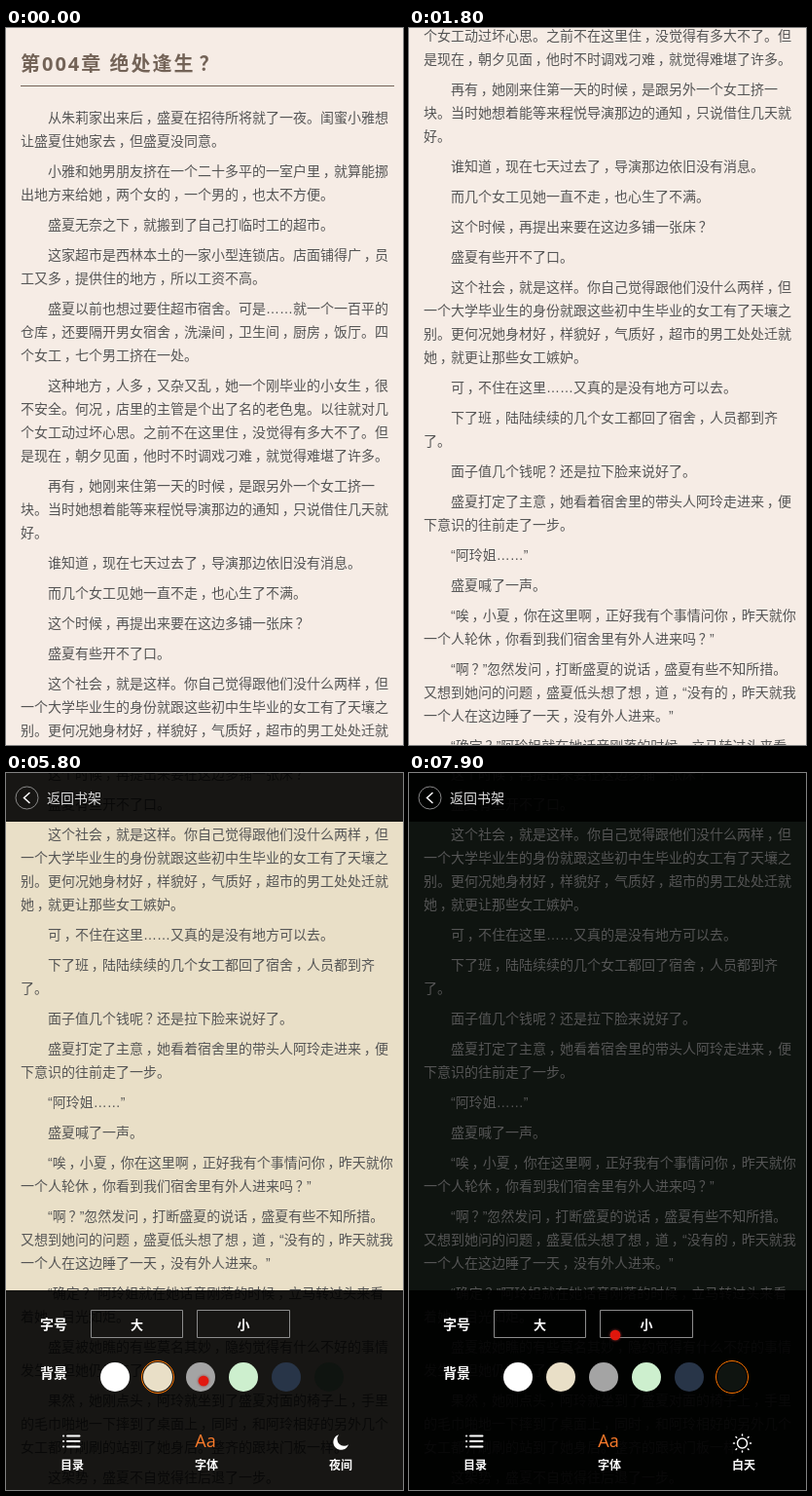
These frames come from a looping animation (408x736 px, 8000 ms). An HTML page:

```html
<!DOCTYPE html>
<html lang="zh-CN">
<head>
<meta charset="utf-8">
<style>
html, body { margin: 0; width: 100%; height: 100%; overflow: hidden; }
body { position: relative; color: #555; font: 14px/24px "Liberation Sans", "Noto Sans CJK SC", "Noto Sans CJK", sans-serif; text-spacing-trim: space-all; }
#page { position: absolute; left: 15px; top: 0; width: 384px; will-change: transform; }
h4 { margin: 15px 0 20px; height: 44px; border-bottom: 1px solid #736357; color: #736357;
  font: bold 20px/44px "Open Sans", "Noto Sans CJK SC", "Noto Sans CJK", sans-serif; letter-spacing: 2px; white-space: nowrap; }
p { margin: 7px 0; text-indent: 28px; }
#page i { position: relative; left: .2em; font-style: normal; }
svg { position: absolute; left: 0; top: 0; width: 408px; height: 736px; }
text { fill: #fff; }
.mid { text-anchor: middle; }
.small { font-size: 12px; font-weight: bold; }
.line { fill: none; stroke: #fff; stroke-width: 1.5; stroke-linecap: round; }
#taps circle { fill: none; stroke: #e3170d; stroke-width: 5; filter: drop-shadow(0 0 1.5px #933); }
</style>
</head>
<body>
<div id="page">
<h4>第004章 绝处逢生？</h4>
<p>从朱莉家出来后，盛夏在招待所将就了一夜。闺蜜小雅想让盛夏住她家去，但盛夏没同意。
<p>小雅和她男朋友挤在一个二十多平的一室户里，就算能挪出地方来给她，两个女的，一个男的，也太不方便。
<p>盛夏无奈之下，就搬到了自己打临时工的超市。
<p>这家超市是西林本土的一家小型连锁店。店面铺得广，员工又多，提供住的地方，所以工资不高。
<p>盛夏以前也想过要住超市宿舍。可是……就一个一百平的仓库，还要隔开男女宿舍，洗澡间，卫生间，厨房，饭厅。四个女工，七个男工挤在一处。
<p>这种地方，人多，又杂又乱，她一个刚毕业的小女生，很不安全。何况，店里的主管是个出了名的老色鬼。以往就对几个女工动过坏心思。之前不在这里住，没觉得有多大不了。但是现在，朝夕见面，他时不时调戏刁难，就觉得难堪了许多。
<p>再有，她刚来住第一天的时候，是跟另外一个女工挤一块。当时她想着能等来程悦导演那边的通知，只说借住几天就好。
<p>谁知道，现在七天过去了，导演那边依旧没有消息。
<p>而几个女工见她一直不走，也心生了不满。
<p>这个时候，再提出来要在这边多铺一张床？
<p>盛夏有些开不了口。
<p>这个社会，就是这样。你自己觉得跟他们没什么两样，但一个大学毕业生的身份就跟这些初中生毕业的女工有了天壤之别。更何况她身材好，样貌好，气质好，超市的男工处处迁就她，就更让那些女工嫉妒。
<p>可，不住在这里……又真的是没有地方可以去。
<p>下了班，陆陆续续的几个女工都回了宿舍，人员都到齐了。
<p>面子值几个钱呢？还是拉下脸来说好了。
<p>盛夏打定了主意，她看着宿舍里的带头人阿玲走进来，便下意识的往前走了一步。
<p>“阿玲姐……”
<p>盛夏喊了一声。
<p>“唉，小夏，你在这里啊，正好我有个事情问你，昨天就你一个人轮休，你看到我们宿舍里有外人进来吗？”
<p>“啊？”忽然发问，打断盛夏的说话，盛夏有些不知所措。又想到她问的问题，盛夏低头想了想，道，“没有的，昨天就我一个人在这边睡了一天，没有外人进来。”
<p>“确定？”阿玲姐就在她话音刚落的时候，立马转过头来看着她。目光如炬。
<p>盛夏被她瞧的有些莫名其妙，隐约觉得有什么不好的事情发生，但她仍是点了点头。
<p>果然，她刚点头，阿玲就坐到了盛夏对面的椅子上，手里的毛巾啪地一下摔到了桌面上，同时，和阿玲相好的另外几个女工都齐刷刷的站到了她身后。整齐的跟块门板一样。
<p>这架势，盛夏不自觉得往后退了一步。
</div>
<svg viewBox="0 0 408 736">
  <g id="menu">
    <path d="M0 0H408V50H0ZM0 666H408V736H0Z" opacity=".9"/>
    <circle cx="21.5" cy="25.5" r="11.5" fill="none" stroke="#888"/>
    <path class="line" d="M24 20.5l-5.500 5 5.500 5"/>
    <text x="42" y="31" style="fill:#ddd">返回书架</text>
    <path class="line" style="stroke-width:2" d="M63 680.500H75.500M63 686H75.500M63 691.500H75.500M59 680.500h.1M59 686h.1M59 691.500h.1"/>
    <text id="fontIcon" class="mid" x="205" y="692" style="font:18px 'Open Sans', sans-serif">Aa</text>
    <path id="moon" fill="#fff" d="M342 679.200a8 8 0 1 0 10 10a7.100 7.100 0 0 1-10-10z"/>
    <g id="sun" class="line">
      <circle cx="342.500" cy="688" r="5"/>
      <path d="M342.500 679v1M342.500 696v1M333.500 688h1M350.500 688h1M336 681.500l.7.7M348.300 693.800l.7.7M336 694.500l.7-.7M348.300 682.200l.7-.7"/>
    </g>
    <g class="mid small">
      <text x="68" y="715">目录</text>
      <text x="206" y="715">字体</text>
      <text id="mode" x="344" y="715">夜间</text>
    </g>
  </g>
  <g id="panel">
    <path d="M0 531H408V666H0Z" opacity=".9"/>
    <g font-weight="bold">
      <text x="35" y="571">字号</text>
      <text x="35" y="621">背景</text>
      <text class="mid" x="134.500" y="571" font-size="13">大</text>
      <text class="mid" x="244" y="571" font-size="13">小</text>
    </g>
    <path d="M87.500 551.500h94v28h-94zM196.500 551.500h95v28h-95z" fill="none" stroke="#8c8c8c"/>
    <g id="swatches"></g>
    <circle id="ring" cy="620" r="16.500" fill="none" stroke="#ff7800"/>
  </g>
  <g id="taps"></g>
</svg>
<script>
const LOOP = 8000, TAP = 600, DELAY = 150, SCROLL = 610;
const colors = ['#fff', '#e9dfc7', '#a4a4a4', '#cdefce', '#283548', '#0f1410'];
const swatchX = i => 112 + 44 * i;
// time, x, y, chosen background
const taps = [
  [2690, 165, 513], [4250, 204, 692],
  [4750, 112, 622, 0], [5200, 157, 624, 1], [5790, 203, 624, 2],
  [6250, 246, 626, 3], [6700, 288, 628, 4], [7300, 333, 629, 5],
  [7890, 212, 577]
];
const $ = id => document.getElementById(id);
const show = (id, on) => $(id).style.display = on ? '' : 'none';

// Commas and question marks sit in the middle of their cell.
$('page').innerHTML = $('page').innerHTML.replace(/[，？]/g, '<i>$&</i>');
$('swatches').innerHTML = colors.map((c, i) =>
  `<circle cx="${swatchX(i)}" cy="620" r="15" fill="${c}"/>`).join('');
$('taps').innerHTML = taps.map(([, x, y]) => `<circle cx="${x}" cy="${y}"/>`).join('');
const dots = [...$('taps').children];

function draw(t) {
  const scroll = Math.min(1, Math.max(0, (t - 400) / 2100)) * SCROLL;
  $('page').style.transform = `translateY(${-Math.round(scroll)}px)`;

  let chosen = -1;
  taps.forEach(([start, , , color], i) => {
    const age = t - start;
    if (color !== undefined && age >= DELAY) chosen = color;
    const visible = age >= 0 && age < TAP;
    dots[i].style.display = visible ? '' : 'none';
    if (visible) {
      dots[i].setAttribute('r', 2.5 + age * 0.032);
      dots[i].style.opacity = 1 - age / 700;
    }
  });

  const open = t >= taps[1][0] + DELAY, night = chosen === 5;
  show('menu', t >= taps[0][0] + DELAY);
  show('panel', open);
  show('ring', chosen >= 0);
  show('moon', !night);
  show('sun', night);
  $('mode').textContent = night ? '白天' : '夜间';
  $('fontIcon').style.fill = open ? '#f97a2a' : '#fff';
  $('ring').setAttribute('cx', swatchX(chosen));
  document.body.style.background = colors[chosen] || '#f6ece5';
}

function tick() {
  draw(performance.now() % LOOP);
  requestAnimationFrame(tick);
}
tick();
</script>
</body>
</html>
```
